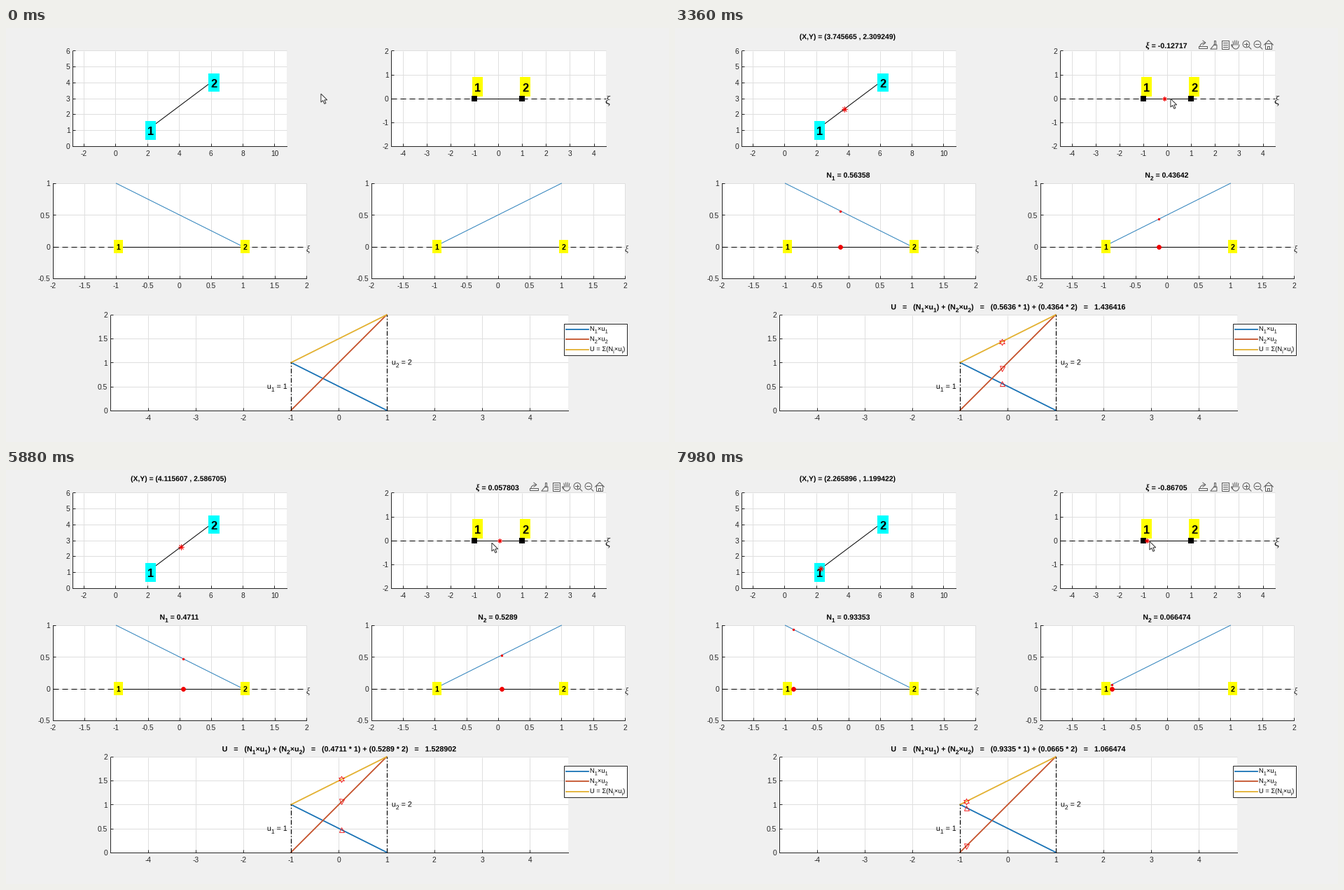
A matplotlib script that plays this animation: 947x592 px, repeating every 8 s.

```python
from itertools import groupby

import numpy as np
import matplotlib.pyplot as plt
from matplotlib.animation import FuncAnimation
from matplotlib.patches import Circle, PathPatch, Polygon, Rectangle
from matplotlib.path import Path
from matplotlib.textpath import TextPath
from matplotlib.transforms import Affine2D

W, H, DPI = 947, 592, 64
PT = 72 / DPI  # points per pixel
LOOP, FRAMES, STEP = 8000, 100, 70
INK, GRID, RED, ICON = "#262626", "#dfdfdf", "#f00000", "#5c5c5c"
BLUE, ORANGE, GOLD = "#1872b5", "#c4512a", "#e3b02f"
SANS, SERIF = "Liberation Sans", "Liberation Serif"
SNAP = 0.1  # keeps half-pixel coordinates on their own pixel

plt.rcParams["font.family"] = SANS
fig = plt.figure(figsize=(W / DPI, H / DPI), dpi=DPI, facecolor="#f0f0f0")
ax = fig.add_axes([0, 0, 1, 1])
ax.set(xlim=(SNAP, W + SNAP), ylim=(H - SNAP, -SNAP))
ax.axis("off")


def label(x, y, s, size=10.2, ha="center", color="black", **kw):
    """Text whose digits are centred vertically on y."""
    return ax.text(x, y + 0.36 * size, s, fontsize=size * PT, ha=ha,
                   va="baseline", color=color, **kw)


class Rich:
    """Text where _ lowers the next character and ξ is an italic symbol."""

    def __init__(self, x, y, s="", size=10.5, ha="center", weight="bold"):
        self.x, self.y, self.size = x, y, size
        self.ha, self.weight = ha, weight
        self.patch = ax.add_patch(PathPatch(Path(np.zeros((1, 2))), fc="black",
                                            lw=0, zorder=3))
        if s:
            self.set(s)

    def set(self, s):
        kinds = [(c, "sub" if prev == "_" else "xi" if c == "ξ" else "text")
                 for prev, c in zip(" " + s, s) if c != "_"]
        x, paths = 0, []
        for kind, group in groupby(kinds, key=lambda item: item[1]):
            run = "".join(c for c, _ in group)
            sub, xi = kind == "sub", kind == "xi"
            font = dict(family=SERIF if xi else SANS, weight=self.weight,
                        style="italic" if xi else "normal")
            size = self.size * (0.8 if sub else 1.15 if xi else 1)
            drop = -0.36 * self.size if sub else 0

            def width(text):
                return TextPath((0, 0), text, size, prop=font).get_extents().width

            paths.append(TextPath((x, drop), run, size, prop=font))
            x += width(f"|{run}|") - width("||")
        left = self.x - (x / 2 if self.ha == "center" else 0)
        flip = Affine2D().scale(1, -1).translate(left, self.y + 0.36 * self.size)
        self.patch.set_path(Path.make_compound_path(*paths).transformed(flip))


def line(xs, ys, color="black", lw=1.0, **kw):
    return ax.plot(xs, ys, color=color, lw=lw * PT, **kw)[0]


def box(x0, y0, x1, y1, **kw):
    kw.setdefault("lw", 0)
    return ax.add_patch(Rectangle((x0, y0), x1 - x0, y1 - y0, **kw))


def marker(shape, size, filled=False):
    return ax.plot([], [], ls="", marker=shape, ms=size * PT, mec=RED,
                   mfc=RED if filled else "none", mew=0.8 * PT, zorder=4)[0]


class Panel:
    def __init__(self, box_px, origin, scale, xticks, yticks):
        x0, y0, x1, y1 = self.box = box_px
        self.origin, self.scale = origin, scale
        box(x0, y0, x1, y1, color="white", zorder=0)
        tx, ty = self.x(np.array(xticks)), self.y(np.array(yticks))
        ax.vlines(tx, y0, y1, color=GRID, lw=PT, zorder=1)
        ax.hlines(ty, x0, x1, color=GRID, lw=PT, zorder=1)
        ax.vlines(tx, y1 - 4, y1, color=INK, lw=PT, zorder=1.5)
        ax.hlines(ty, x0, x0 + 4, color=INK, lw=PT, zorder=1.5)
        line([x0, x0, x1], [y0, y1, y1], INK, zorder=1.5)
        for px, v in zip(tx, xticks):
            label(px, y1 + 10.5, f"{v:g}", color=INK)
        for py, v in zip(ty, yticks):
            label(x0 - 4, py + 0.5, f"{v:g}", ha="right", color=INK)

    def x(self, v):
        return self.origin[0] + self.scale * v

    def y(self, v):
        return self.origin[1] - self.scale * v

    def plot(self, xs, ys, *args, **kw):
        return line(self.x(np.array(xs)), self.y(np.array(ys)), *args, **kw)

    def place(self, mark, x, y):
        mark.set_data([self.x(x)], [self.y(y)])

    def xi_axis(self, size, dx, dy):
        y = self.y(0)
        for a, b in ((self.box[0], self.x(-1)), (self.x(1), self.box[2])):
            line([a, b], [y, y], dashes=(8, 5))
        self.plot([-1, 1], [0, 0])
        label(self.box[2] + dx, y + dy, "ξ", size, color=INK,
              family=SERIF, style="italic")


def node(cx, cy, w, h, s, color, size):
    box(cx - w / 2, cy - h / 2, cx + w / 2, cy + h / 2, color=color, zorder=2.5)
    label(cx, cy + 0.5, s, size, weight="bold")


# Panels
halves, units = np.arange(-2, 2.5, 0.5), range(-4, 5)
real = Panel((95.5, 32.5, 401.5, 168.5), (156.6, 168.5), 22.7,
             range(-2, 11, 2), range(7))
ref = Panel((550.5, 32.5, 857, 168.5), (703.3, 100.5), 34.1,
            units, range(-2, 3))
shape1, shape2 = (
    Panel((x - 181, 222, x + 181, 357.5), (x, 312.5), 90.5,
          halves, np.arange(-0.5, 1.5, 0.5)) for x in (248, 703))
field = Panel((149, 410.5, 803, 546.5), (475.5, 546.5), 68.2,
              units, np.arange(0, 2.5, 0.5))

real.plot([2, 6], [1, 4])
for name, x, y in (("1", 2, 1), ("2", 6, 4)):
    node(real.x(x) + 4.4, real.y(y) + 0.4, 15.5, 26.5, name, "cyan", 16.5)

ref.xi_axis(17, 2.5, 2)
for name, xi in (("1", -1), ("2", 1)):
    px = ref.x(xi)
    node(px + 4.5, 84, 15, 28, name, "yellow", 16.5)
    box(px - 4, 96.5, px + 4, 104.5, color="black", zorder=3)
    for panel, slope in ((shape1, -1), (shape2, 1)):
        node(panel.x(xi) + 2.7, 312.8, 13, 19, name, "yellow", 10.5)

for panel, slope in ((shape1, -1), (shape2, 1)):
    panel.xi_axis(12, 2, 2.5)
    panel.plot([-1, 1], [(1 - slope) / 2, (1 + slope) / 2], "#2b80ba")

for ends, color in (([1, 0], BLUE), ([0, 2], ORANGE), ([1, 2], GOLD)):
    field.plot([-1, 1], ends, color, 1.8)
for i, xi, x, y in ((1, -1, 373, 512), (2, 1, 551, 477.5)):
    field.plot([xi, xi], [0, i], lw=1.2, dashes=(5.5, 2.2, 1.3, 2.2))
    Rich(x, y, f"u_{i} = {i}", 10.7, "left", "normal")

box(797.5, 422.5, 887.5, 467.5, fc="white", ec=INK, lw=PT, zorder=2)
legend = ((BLUE, "N_1×u_1"), (ORANGE, "N_2×u_2"), (GOLD, "U = Σ(N_i×u_i)"))
for i, (color, s) in enumerate(legend):
    y = 430.5 + 14.5 * i
    line([800.5, 832], [y, y], color, 1.8, zorder=2.2)
    Rich(834, y - 1, s, 9.4, "left", "normal")

# Axes toolbar
toolbar = []


def stroke(x, xs, ys):
    toolbar.append(line(x + np.array(xs), 24 + np.array(ys), ICON, 1, zorder=3))


def frame(x, w, top, bottom):
    stroke(x, [-w, w, w, -w, -w], [top, top, bottom, bottom, top])


bend = np.linspace(0, np.pi / 2, 9)
stroke(754, 3 - 7 * np.sin(bend), -3 + 5 * (1 - np.cos(bend)))  # export
stroke(754, [0, 4, 0], [-6, -3, 0])
frame(754, 6, 2, 5)
frame(771, 1.2, -6, 0)  # brush
stroke(770, [0, 4, 4, -5, 0], [0, 0, 6, 6, 0])
frame(786, 5, -6, 6)  # data tip
for y in (-3, 0, 3):
    stroke(786, [-2.5, 3], [y, y])
for x in (-3, -1, 1, 3):  # hand
    stroke(801, [x, 1.3 * x], [0, abs(x) / 2 - 6.5])
stroke(801, 5 * np.cos(2 * bend), 6 * np.sin(2 * bend))
stroke(801, [-5, -6.5, -4], [3, 0, 0])
for x, signs in ((816, 2), (832, 1)):  # zoom in, zoom out
    toolbar.append(ax.add_patch(Circle((x, 23), 4.8, fill=False, ec=ICON,
                                       lw=PT, zorder=3)))
    stroke(x, [3.5, 7], [2.5, 6])
    for bar in ([[-2.5, 2.5], [-1, -1]], [[0, 0], [-3.5, 1.5]])[:signs]:
        stroke(x, *bar)
stroke(848, [-6.5, 0, 6.5], [0, -6.5, 0])  # home
frame(848, 4.5, -2, 6)
frame(848, 1.5, 1.5, 6)

# Titles and moving marks
title_xy = Rich(246.5, 12, size=10.35)
title_xi = Rich(702, 25, size=10.6)
title_n1, title_n2 = Rich(247.5, 210), Rich(702.5, 210)
title_u = Rich(476, 398.5, size=10.7)
titles = [title_xy, title_xi, title_n1, title_n2, title_u]

star_real, star_ref = marker((8, 2, 0), 8), marker((8, 2, 0), 6.5)
base1, base2 = marker("o", 6, True), marker("o", 6, True)
dot1, dot2 = marker("o", 2.6, True), marker("o", 2.6, True)
up, down, hexagram = marker("^", 7), marker("v", 7), marker((6, 1, 0), 9)
result = [title.patch for title in titles] + [
    star_real, star_ref, base1, base2, dot1, dot2, up, down, hexagram]

ARROW = np.array([(0, 0), (0, 12), (2.8, 9.5), (5, 14.3), (7, 13.4),
                  (4.9, 8.8), (8.8, 8.8)])
cursor = ax.add_patch(Polygon(ARROW, fc="white", ec="#333333", lw=PT, zorder=6))

# The marks follow the pointer with a delay, on a fixed grid of positions
LAG, UNIT, HOVER = 260, 86.5, 550
PATH = np.array([(750, -642), (1520, -227), (2060, -86), (2520, -75),
                 (2780, -72), (4270, 67), (4530, 88), (5880, 5), (6140, -24),
                 (6930, -51), (7190, -62), (7500, -85), (7980, -75), (8240, -64)])


def position(t):
    return np.interp(t, *PATH.T)


def update(number):
    t = ((number + 1) * LOOP // FRAMES - 1) // STEP * STEP
    tip_x = ref.x(position(t + LAG) / UNIT)
    tip_y = np.interp(t, (490, 1260, 4500, 6400, 7980), (94, 102, 101, 105, 102))
    cursor.set_xy(ARROW + np.round((tip_x, tip_y)))
    for part in toolbar:
        part.set_visible(tip_x >= HOVER)

    active = position(t) >= -UNIT
    for part in result:
        part.set_visible(active)
    if not active:
        return [cursor, *toolbar, *result]

    xi = min(round(position(t)), 86) / UNIT
    n1, n2 = (1 - xi) / 2, (1 + xi) / 2
    x, y, u = 4 + 2 * xi, 2.5 + 1.5 * xi, n1 + 2 * n2

    real.place(star_real, x, y)
    ref.place(star_ref, xi, 0)
    for panel, base, dot, n in ((shape1, base1, dot1, n1),
                                (shape2, base2, dot2, n2)):
        panel.place(base, xi, 0)
        panel.place(dot, xi, n)
    field.place(up, xi, n1)
    field.place(down, xi, 2 * n2)
    field.place(hexagram, xi, u)

    title_xy.set(f"(X,Y) = ({x:.6f} , {y:.6f})")
    title_xi.set(f"ξ = {xi:.5g}")
    title_n1.set(f"N_1 = {n1:.5g}")
    title_n2.set(f"N_2 = {n2:.5g}")
    title_u.set("U   =   (N_1×u_1) + (N_2×u_2)   =   "
                f"({n1:.4f} * 1) + ({n2:.4f} * 2)   =   {u:.6f}")
    return [cursor, *toolbar, *result]


anim = FuncAnimation(fig, update, frames=FRAMES, interval=LOOP / FRAMES,
                     repeat=True, repeat_delay=0)
plt.show()
```
